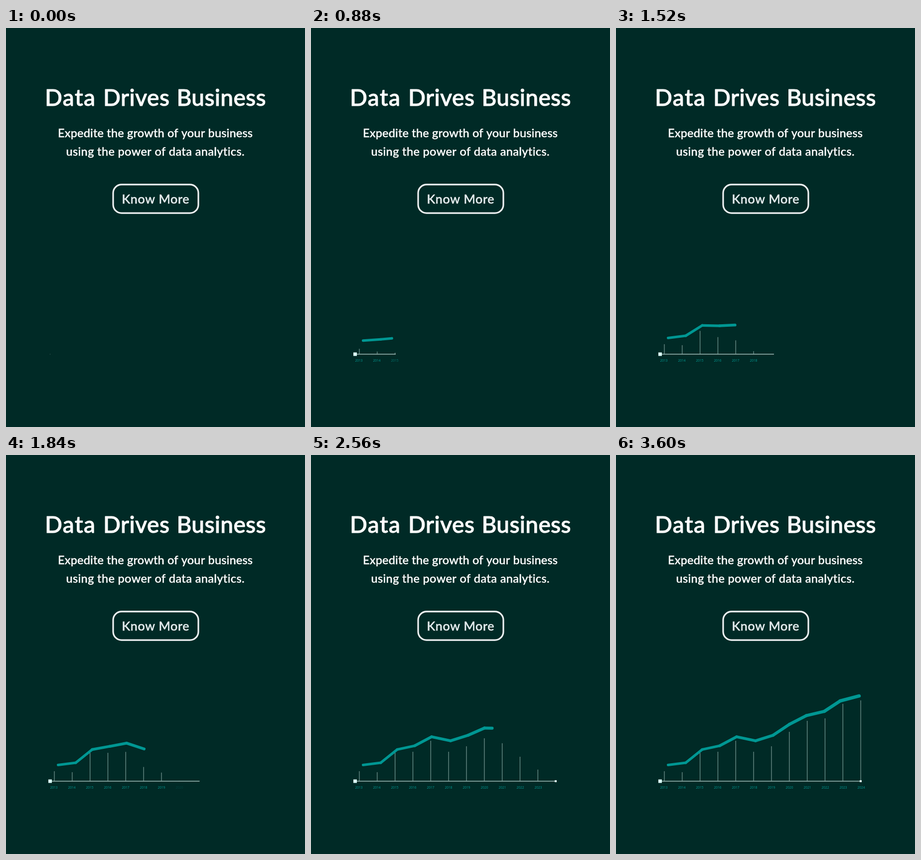
An HTML page with a canvas for the animation above (10000 ms loop, 600 by 800 pixels).

```html
<!DOCTYPE html>
<html lang="en">
<head>
<meta charset="utf-8">
<title>Data Drives Business</title>
<style>
  html, body { margin: 0; width: 100%; height: 100%; overflow: hidden; background: #002a26; }
  canvas { display: block; width: 100vw; height: 100vh; }
</style>
</head>
<body>
<canvas id="stage" width="600" height="800"></canvas>
<script>
const ctx = document.getElementById('stage').getContext('2d');
const LOOP = 10000, STEP = 80, END = 3600;
const BASE = 654, FIRST_YEAR = 2013;
const HEIGHTS = [20, 18, 57, 59, 81, 59, 70, 99, 121, 126, 155, 162];
const TREND = [
  [104.5, 621.5], [140, 617], [173, 590.5], [208, 583], [242, 565], [280, 573],
  [315, 562], [348, 540], [382, 522.5], [418, 514], [450, 493], [488, 483]
];
const AXIS = [[480, 88], [560, 103], [1200, 237], [1520, 317], [2160, 460], [2320, 491]];

const clamp = v => Math.max(0, Math.min(1, v));
const lerp = (a, b, k) => a + (b - a) * k;

// Piecewise linear lookup in a list of [x, y] points.
function along(points, x) {
  if (x <= points[0][0]) return points[0][1];
  for (let i = 1; i < points.length; i++) {
    const [x0, y0] = points[i - 1], [x1, y1] = points[i];
    if (x <= x1) return lerp(y0, y1, (x - x0) / (x1 - x0));
  }
  return points[points.length - 1][1];
}

// A thin outline in the fill colour adds weight to the letters.
function text(str, x, y, size, family, color, spacing = 0, weight = 0) {
  ctx.font = size + 'px ' + family;
  ctx.letterSpacing = spacing + 'px';
  ctx.fillStyle = ctx.strokeStyle = color;
  ctx.fillText(str, x + spacing / 2, y);
  if (weight) {
    ctx.lineWidth = weight;
    ctx.strokeText(str, x + spacing / 2, y);
  }
}

function line(x0, y0, x1, y1, width, color) {
  ctx.lineWidth = width;
  ctx.strokeStyle = color;
  ctx.beginPath();
  ctx.moveTo(x0, y0);
  ctx.lineTo(x1, y1);
  ctx.stroke();
}

function square(x, y, size) {
  ctx.fillStyle = '#dcfffa';
  ctx.fillRect(x - size / 2, y - size / 2, size, size);
}

function drawCopy() {
  const face = 'Lato, "Open Sans", sans-serif';
  const title = (word, x, gap) => text(word, x, 156, '500 46', face, '#fff', gap, 1);
  const body = (str, y, gap) => text(str, 299.5, y, '500 23.5', face, '#fff', gap, 0.4);
  title('Data', 128.5, 1.5);
  title('Drives', 261.5, 0.6);
  title('Business', 432, 0.35);
  body('Expedite the growth of your business', 219, 0.17);
  body('using the power of data analytics.', 256, 0.36);

  ctx.strokeStyle = '#eef1f2';
  ctx.lineWidth = 3.2;
  ctx.beginPath();
  ctx.roundRect(215, 313.8, 171, 57.4, 17);
  ctx.stroke();
  text('Know More', 300, 352, '500 25', face, '#e6ecee', 0.65, 0.5);
}

function drawChart(t) {
  const phase = i => t - 200 * i;
  const grow = HEIGHTS.map((h, i) => clamp((phase(i) - 435) / 835));

  ctx.lineCap = 'butt';
  HEIGHTS.forEach((h, i) => {
    const x = 97 + 35.83 * i;
    if (grow[i] > 0) line(x, BASE, x, BASE - h * grow[i], 1.3, '#6f918c');
    ctx.globalAlpha = clamp((phase(i) - 420) / 90);
    text(FIRST_YEAR + i, 96 + 36 * i, 669, '6.6', '"Open Sans", sans-serif', '#009a94');
    ctx.globalAlpha = 1;
  });

  const tip = along(AXIS, t);
  if (tip > 88) line(88, BASE, tip, BASE, 1.5, '#a3bbb7');
  square(88.5, BASE, Math.min(7, 0.6 + t * 0.02));
  if (tip >= 491) square(491, BASE, 4);

  // Each trend point lags its final height together with its bar.
  const pts = TREND.map(([x, y], i) => [x, y + 0.57 * HEIGHTS[i] * (1 - grow[i])]);
  const head = lerp(103, 488, clamp((t - 385) / (END - 385)));
  ctx.lineCap = 'round';
  for (let i = 1; i < pts.length && pts[i - 1][0] < head; i++) {
    const x = Math.min(head, pts[i][0]);
    line(...pts[i - 1], x, along(pts, x), 4.9 + 0.15 * i, '#009793');
  }
}

function draw(now) {
  const t = Math.min(END, Math.floor((now % LOOP) / STEP) * STEP);
  ctx.fillStyle = '#002a26';
  ctx.fillRect(0, 0, 600, 800);
  ctx.textAlign = 'center';
  ctx.lineJoin = 'round';
  drawCopy();
  drawChart(t);
}

const start = performance.now();
function frame() {
  draw(performance.now() - start);
  requestAnimationFrame(frame);
}
frame();
</script>
</body>
</html>
```
